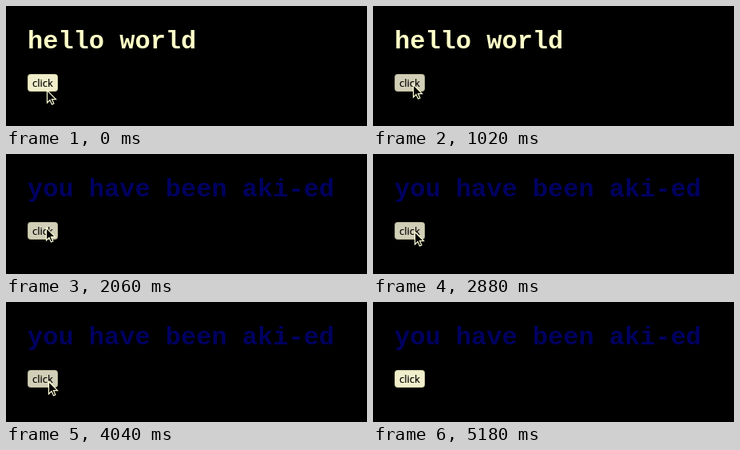
An HTML page for the animation above (5280 ms loop, 452 by 150 pixels).

```html
<!DOCTYPE html>
<html lang="en">
<head>
<meta charset="utf-8">
<title>Click demo</title>
<style>
html, body { margin: 0; width: 100%; height: 100%; overflow: hidden; background: #000; }
svg { display: block; width: 452px; height: 150px; background: #000; }
#title { font: bold 32px "Liberation Mono", "Courier New", monospace; white-space: pre; }
#label { font: 13px "Open Sans", "Noto Sans", sans-serif; fill: #000; stroke: #000; stroke-width: .2px; }
</style>
</head>
<body>
<svg viewBox="0 0 452 150">
  <text id="title" x="27" y="53"></text>
  <rect id="button" x="27.5" y="85.5" width="37" height="21" rx="3"/>
  <text id="label" x="33" y="101">click</text>
  <path id="cursor" d="M.5 .5V16L4 12.6L6.5 18L8.9 17L6.5 11.6H11.5Z"
        fill="#000" stroke="#ffffd8" stroke-width="1.2"/>
</svg>
<script>
const LOOP = 5280, CLICK = 1940, GONE = 4700;
const [title, button, cursor] = ["title", "button", "cursor"].map(id => document.getElementById(id));

const linear = p => p;
const easeIn = p => p * p;
const easeOut = p => 1 - (1 - p) ** 3;

// The pointer rises onto the button, sinks back a little, then leaves the stage.
const home = { x: 51, y: 105 };
const moves = [
  { from: 0, to: 1800, x: 50, y: 92, ease: linear },
  { from: 2480, to: 3620, x: 53, y: 99, ease: easeOut },
  { from: 4180, to: 4660, x: 238, y: 138, ease: easeIn }
];

function pointer(t) {
  let { x, y } = home;
  for (const m of moves) {
    if (t < m.from) break;
    const last = m === moves[moves.length - 1];
    const p = (t - m.from) / (m.to - m.from);
    const k = m.ease(last ? p : Math.min(p, 1));
    x += (m.x - x) * k;
    y += (m.y - y) * k;
  }
  return [Math.round(x), Math.round(y)];
}

function draw(t) {
  const clicked = t >= CLICK;
  title.textContent = clicked ? "you have been aki-ed" : "hello world";
  title.setAttribute("fill", clicked ? "#000060" : "#ffffc8");

  const [x, y] = pointer(t);
  const hover = x >= 27 && x < 65 && y >= 85 && y < 105;
  button.setAttribute("fill", hover ? "#d2cfb8" : "#f0eecb");
  button.setAttribute("stroke", hover ? "#b4b294" : "#d0cea0");

  cursor.setAttribute("transform", `translate(${x} ${y})`);
  cursor.setAttribute("visibility", t < GONE ? "visible" : "hidden");
}

let start;
function tick(now) {
  start ??= now;
  draw((now - start) % LOOP);
  requestAnimationFrame(tick);
}
draw(0);
requestAnimationFrame(tick);
</script>
</body>
</html>
```
